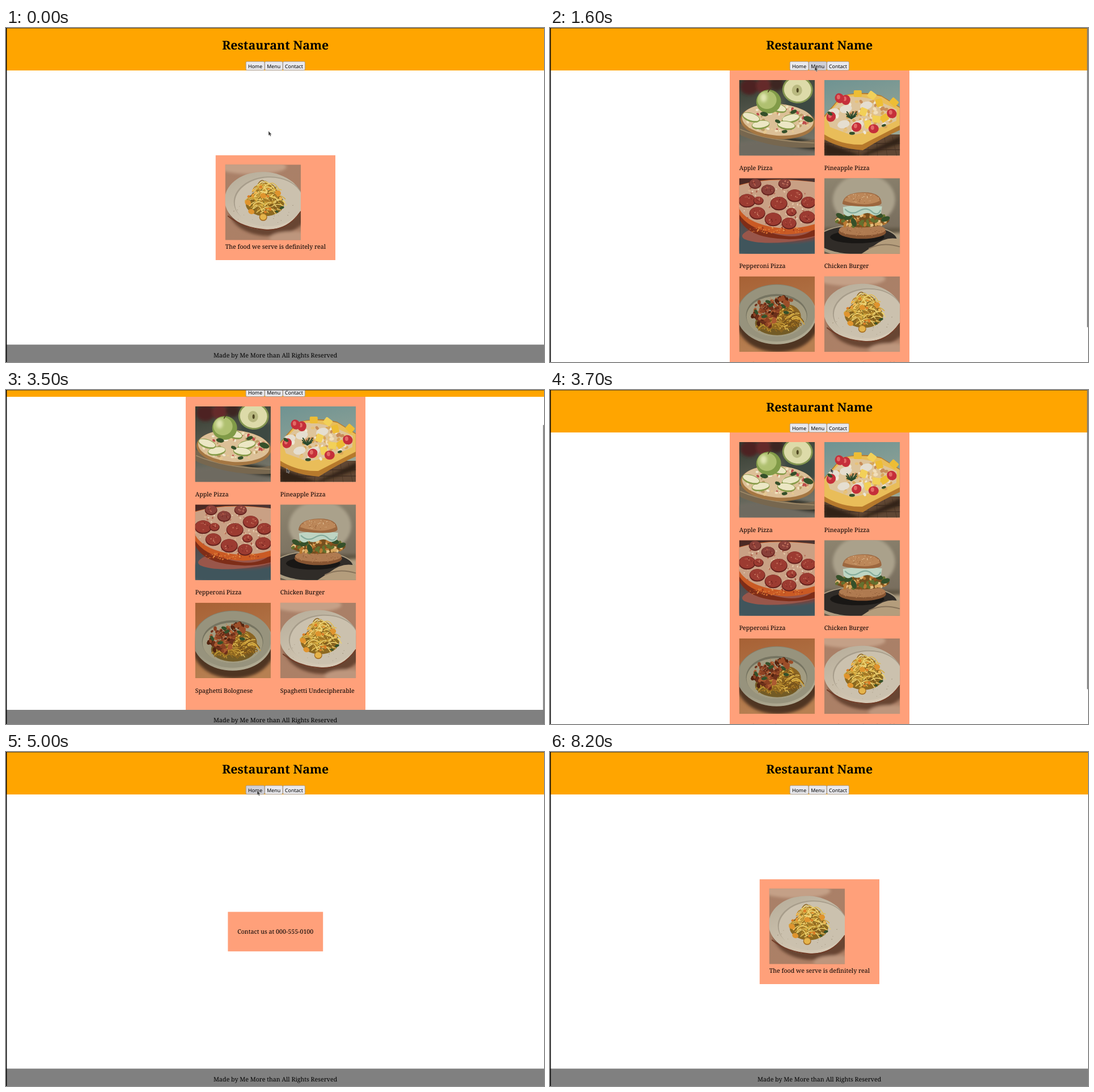
An HTML page for the animation above (8300 ms loop, 949 by 590 pixels).

```html
<!DOCTYPE html>
<html lang="en">
<head>
<meta charset="utf-8">
<title>Restaurant Name</title>
<style>
  html, body { margin: 0; width: 100%; height: 100%; overflow: hidden; background: #fff; }
  svg#stage { display: block; width: 949px; height: 590px; }
  text { font: 10.667px "Noto Serif", serif; fill: #000; text-rendering: geometricPrecision; }
  .title { font-size: 21.333px; font-weight: 700; }
  .button text { font: 8.889px "Noto Sans", sans-serif; }
  .button rect { fill: #e9e9ed; stroke: #8f8f9d; stroke-width: .7; }
  .button.hover rect { fill: #d0d0d7; }
  .button.active rect { fill: #b1b1b9; }
  .middle { text-anchor: middle; }
</style>
</head>
<body>
<svg id="stage" viewBox="0 0 949 590" xmlns="http://www.w3.org/2000/svg">
  <defs>
    <filter id="soft" x="-30%" y="-30%" width="160%" height="160%"><feGaussianBlur stdDeviation="2.5"/></filter>
    <filter id="fine" x="-10%" y="-10%" width="120%" height="120%"><feGaussianBlur stdDeviation=".55"/></filter>
    <g id="dishes"></g>
  </defs>
  <rect width="949" height="590" fill="#fff"/>
  <g id="view"></g>
  <rect width="949" height=".8" fill="#222" opacity=".75"/>
  <rect width="1.4" height="590" fill="#000"/>
  <rect id="bar" x="947.4" width="1.6" height="528.5" fill="#777"/>
  <path id="cursor" d="M0 0V8L1.8 6.5 3.1 9.2 4.6 8.5 3.4 5.9H5.6Z" fill="#3c3c3c" stroke="#ddd" stroke-width=".5"/>
</svg>
<script>
const $ = id => document.getElementById(id);

// ---------- drawing helpers ----------
let seed = 1;
const random = () => (seed = seed * 16807 % 2147483647) / 2147483647;
const pick = list => list[Math.floor(random() * list.length)];
const times = (n, make) => Array.from({ length: n }, (_, i) => make(i)).join('');

const rect = (x, y, w, h, fill) => `<rect x="${x}" y="${y}" width="${w}" height="${h}" fill="${fill}"/>`;
const oval = (x, y, rx, ry, fill, turn = 0, extra = '') =>
  `<ellipse cx="${x}" cy="${y}" rx="${rx}" ry="${ry}" fill="${fill}" transform="rotate(${turn} ${x} ${y})" ${extra}/>`;
const path = (d, fill, extra = '') => `<path d="${d}" fill="${fill}" ${extra}/>`;
const line = (d, color, width) => path(d, 'none', `stroke="${color}" stroke-width="${width}" stroke-linecap="round"`);
const soft = body => `<g filter="url(#soft)">${body}</g>`;
const fine = body => `<g filter="url(#fine)">${body}</g>`;

function inOval(x, y, rx, ry) {
  const a = random() * Math.PI * 2, r = Math.sqrt(random());
  return [x + Math.cos(a) * rx * r, y + Math.sin(a) * ry * r];
}
const scatter = (n, area, size, colors) => times(n, () => {
  const [x, y] = inOval(...area), r = size * (.5 + random() * .6);
  return oval(x.toFixed(1), y.toFixed(1), r.toFixed(1), (r * .7).toFixed(1), pick(colors), Math.round(random() * 180));
});
const noodles = (n, area, colors) => times(n, () => {
  const [x, y] = inOval(...area), w = 5 + random() * 9, h = random() * 16 - 8;
  const p = v => v.toFixed(1);
  return line(`M${p(x - w)} ${p(y + h / 2)}Q${p(x)} ${p(y - 12 + h)} ${p(x + w)} ${p(y - h / 3)}`, pick(colors), 1.5);
});
const backdrop = (id, from, to) =>
  `<linearGradient id="${id}" x2=".25" y2="1"><stop stop-color="${from}"/><stop offset="1" stop-color="${to}"/></linearGradient>` +
  rect(0, 0, 134, 134, `url(#${id})`);
const plate = (id, x, y, rx, ry, light, dark, turn = 0) =>
  `<linearGradient id="${id}" x2=".6" y2="1"><stop stop-color="${dark}"/><stop offset="1" stop-color="${light}"/></linearGradient>` +
  oval(x, y, rx, ry, `url(#${id})`, turn);

// ---------- dishes, each 133.3 square ----------
const leaf = (x, y, turn, size = 7) => oval(x, y, size, size * .55, '#35502a', turn);

const dishes = {
  apple: () => backdrop('bg1', '#343b31', '#77766a') +
    soft(oval(18, 12, 16, 14, '#4d2422') + oval(43, 10, 13, 14, '#652c29') + oval(66, 7, 12, 12, '#3d2520') +
      rect(80, 30, 54, 35, '#3e4a43') + oval(60, 122, 85, 16, '#6e6b60') + oval(112, 113, 40, 8, '#2b2922', 10)) +
    fine(path('M0 76Q28 92 70 102T134 104V119Q82 122 40 110T0 94Z', '#77674f') +
      line('M2 87Q50 108 132 111', '#a08b69', 1.5) +
      oval(68, 73, 66, 31, '#a57743', 4) + oval(68, 70, 63, 28, '#dcc097', 4) +
      scatter(95, [68, 70, 59, 25], 3.2, ['#efe0bb', '#cf8a68', '#bd4d4b', '#e6c890', '#b99a62', '#f0e9d0']) +
      oval(103, 17, 27, 24, '#839550', 5) + oval(103, 17, 24, 21, '#dddba9', 5) +
      oval(102, 18, 9, 10, '#b9b980') + oval(103, 18, 2, 4, '#504923') +
      [[38, 79, -8], [91, 68, -12], [21, 66, 18], [68, 49, 18], [83, 80, 8]].map(([x, y, a]) =>
        oval(x, y, 16, 8, '#879b49', a) + oval(x, y - 1, 15, 6, '#ece7c4', a)).join('') +
      oval(52, 38, 22, 21, '#819b48') + oval(49, 35, 17, 16, '#afc070') +
      soft(oval(43, 31, 6, 8, '#e0e5b0')) + line('M51 21Q53 16 57 14', '#4b3721', 1.5) +
      leaf(44, 60, 10) + leaf(68, 73, 25, 5) + leaf(96, 56, -20, 6) + leaf(122, 69, 18, 9) + leaf(80, 91, -10, 5)),

  pineapple: () => backdrop('bg2', '#6f9392', '#a0aa98') +
    rect(0, 96, 134, 38, '#604734') + line('M0 112H134M0 123H134', '#38291f', 1.2) +
    times(9, i => line(`M${i * 17 - 8} 134L${i * 14 + 8} 100`, '#493526', .8)) +
    soft(path('M0 110L64 133 134 99V112L70 134H0Z', '#302419')) +
    fine(path('M0 63L30 28Q65 18 100 27L134 48V88Q104 101 68 124Q32 122 0 105Z', '#b6792c') +
      path('M0 66L32 27Q70 21 101 29L133 49V80L67 114Q30 115 0 96Z', '#e9bd59') +
      path('M3 63L36 30Q75 24 128 52L127 72Q85 92 48 97L10 83Z', '#dec49a') +
      scatter(85, [66, 63, 58, 30], 4, ['#f2dfb9', '#d8a659', '#efe7d5', '#c88c58', '#e8c279']) +
      [[16, 57], [38, 51], [59, 79], [34, 78], [74, 45]].map(([x, y]) => oval(x, y, 11, 7, '#e5ded0', -15)).join('') +
      [[59, 24], [84, 27], [97, 40], [69, 56], [106, 67], [92, 69], [123, 39], [77, 78]].map(([x, y], i) =>
        `<rect x="${x - 7}" y="${y - 6}" width="14" height="12" rx="2" fill="${i % 2 ? '#f2d058' : '#edbd35'}" transform="rotate(${i * 37} ${x} ${y})"/>`).join('') +
      [[38, 35], [12, 65], [57, 83], [87, 86], [119, 59], [27, 32]].map(([x, y], i) =>
        oval(x, y, 8, 9, '#c52f3a', i * 30) + oval(x - 2, y - 2, 3, 4, '#e36a66')).join('') +
      times(9, i => line(`M48 68l${Math.round(Math.cos(i * .5 + 2.6) * 9)} ${Math.round(-4 - (i % 3) * 4)}`, '#29492d', 2)) +
      leaf(10, 59, 35, 5) + leaf(49, 94, 0, 5) + leaf(105, 80, -20, 4)),

  pepperoni: () => backdrop('bg3', '#4a251f', '#53666c') +
    soft(oval(68, 118, 90, 22, '#41555b') + oval(85, 95, 72, 18, '#78423a')) +
    fine(oval(80, 96, 75, 17, '#99564a', -5) +
      path('M0 52Q20 88 65 99T134 88V102Q96 112 54 105T0 72Z', '#7e2d18') +
      path('M0 12Q55-5 134 7V91Q94 104 55 96T0 64Z', '#ca5a24') +
      path('M0 13Q50-3 134 7V81Q92 94 52 85T0 54Z', '#c9a084') +
      scatter(120, [68, 47, 70, 41], 2, ['#e2c3a3', '#b87059', '#d9b28f', '#a95c47', '#e8d3bb']) +
      scatter(65, [66, 91, 57, 6], 1.8, ['#d87432', '#a63b1c', '#e28d47'])) +
    fine([[98, 30, 14], [70, 44, 15], [32, 61, 14], [60, 72, 15], [120, 68, 14], [88, 79, 13], [92, 59, 9],
      [122, 42, 13], [51, 20, 12], [80, 9, 11], [14, 39, 15], [34, 39, 9], [28, 9, 11]].map(([x, y, r]) =>
      oval(x, y + 1, r, r * .8, '#64211d') + oval(x, y, r - 1, r * .72, y < 25 ? '#894039' : '#9c3b31') +
      scatter(7, [x, y, r * .6, r * .45], 1.6, ['#b85a49', '#7e2a24', '#c57660'])).join('')),

  burger: () => backdrop('bg4', '#8d846f', '#74695a') +
    soft(oval(70, 38, 55, 45, '#aaa18b') + rect(0, 88, 134, 46, '#605644') + oval(120, 116, 45, 18, '#b3a083', -8)) +
    oval(58, 111, 74, 29, '#aa9c82') + oval(58, 109, 70, 25, '#302c28') +
    fine(oval(58, 104, 48, 11, '#191715') +
      path('M88 119Q110 101 134 108V134H65Z', '#b49d7c') + line('M79 124Q103 112 133 121', '#87735a', 2) +
      oval(67, 95, 42, 12, '#875532') + oval(67, 91, 41, 10, '#af7a50') +
      oval(67, 74, 48, 13, '#76501f') +
      scatter(80, [67, 74, 46, 13], 4, ['#d9a75e', '#b97832', '#8e501d', '#e6c184', '#64712f']) +
      [[28, 67, 30], [42, 69, -20], [96, 65, 20], [108, 72, -20], [52, 78, 70]].map(a => leaf(...a, 8)).join('') +
      path('M33 51Q65 45 102 50L100 62Q91 69 84 64T67 64 50 64Q40 71 34 62Z', '#bed5c3') +
      line('M37 55Q48 66 61 58T84 59 99 57', '#85ab9b', 2.2) +
      path('M32 45Q34 26 67 25T101 44Q99 51 67 50T32 45Z', '#9c673f') +
      path('M35 40Q39 26 67 26T98 40Q84 47 67 46T35 40Z', '#bc8759') +
      scatter(45, [67, 35, 29, 8], .9, ['#d8b284', '#925e37', '#e3c8a2']) +
      scatter(50, [67, 94, 36, 9], 1, ['#bd8759', '#8a5835'])),

  bolognese: () => backdrop('bg5', '#a76135', '#b78052') +
    soft(oval(68, 80, 72, 54, '#4f3523')) +
    plate('pl5', 66, 67, 70, 53, '#b0aa92', '#787664') + oval(66, 65, 68, 50, '#97937d') +
    oval(66, 69, 54, 38, '#767461') + oval(66, 71, 53, 36, '#a29c82') +
    fine(oval(67, 83, 39, 21, '#735b25') + oval(82, 71, 27, 22, '#8a6422') +
      noodles(85, [80, 76, 24, 20], ['#d0a53c', '#a77722', '#e0bc57', '#76521c']) +
      noodles(20, [50, 91, 20, 8], ['#bd9132', '#94691f']) +
      scatter(75, [47, 65, 23, 23], 5, ['#6b2f1a', '#8c4223', '#ac5a31', '#50220f']) +
      scatter(28, [75, 47, 19, 10], 4.5, ['#75341b', '#9c4e29', '#542410']) +
      scatter(22, [56, 53, 28, 16], 1.2, ['#d98450', '#bb7244']) +
      [[51, 45, 20], [56, 51, -30], [30, 63, 60], [83, 64, 10], [44, 71, -10], [78, 53, 40]].map(a => leaf(...a, 5)).join('')),

  pasta: () => backdrop('bg6', '#a98068', '#ac8066') +
    soft(oval(48, 4, 60, 13, '#c4a087') + oval(77, 80, 70, 46, '#674432') + oval(118, 130, 40, 12, '#bd967d')) +
    plate('pl6', 68, 64, 69, 51, '#d5c9b5', '#b5ac99', 3) +
    line('M5 91Q31 112 70 115T133 83', '#713b26', 1.8) +
    oval(76, 64, 61, 43, '#a79d8b', -3) + oval(77, 66, 60, 43, '#cbc1ae', -3) +
    scatter(24, [70, 80, 58, 30], .8, ['#81715b', '#9b8c75']) +
    fine(oval(70, 69, 34, 22, '#8c6921') + oval(72, 52, 21, 20, '#9e7524') +
      noodles(65, [71, 68, 27, 19], ['#d5ab3e', '#b3832a', '#ecd070', '#7b571b']) +
      noodles(45, [72, 49, 17, 14], ['#e0bb50', '#bb8b2d', '#efd578', '#8b651f']) +
      scatter(16, [68, 60, 31, 26], 3.2, ['#e39632', '#db7e27', '#edb652']) +
      [[40, 67], [46, 83], [93, 50], [67, 55]].map(([x, y]) => oval(x, y, 5.5, 4.5, '#df942e', 20)).join('') +
      oval(67, 93, 7, 6.5, '#a66d20') + oval(67, 92.5, 5.7, 5.2, '#e5b44b') +
      scatter(22, [73, 62, 31, 27], 1.1, ['#40501e', '#61662b']) + leaf(100, 76, -20, 4) + leaf(91, 83, 35, 3)),
};

$('dishes').innerHTML = Object.entries(dishes).map(([name, draw], i) => {
  seed = 4177 + i * 911;
  return `<symbol id="${name}" viewBox="0 0 133.3 133.3">${draw()}</symbol>`;
}).join('');

// ---------- page ----------
const buttons = [['Home', 423.2, 455.9], ['Menu', 456.6, 487.9], ['Contact', 488.6, 527.4]];
const menu = [['apple', 'Apple Pizza'], ['pineapple', 'Pineapple Pizza'], ['pepperoni', 'Pepperoni Pizza'],
  ['burger', 'Chicken Burger'], ['bolognese', 'Spaghetti Bolognese'], ['pasta', 'Spaghetti Undecipherable']];

const text = (x, y, words, kind = '') => `<text x="${x}" y="${y}" class="${kind}">${words}</text>`;
const dish = (name, x, y) => `<use href="#${name}" x="${x}" y="${y}" width="133.3" height="133.3"/>`;
const card = (x, y, w, h) => rect(x, y, w, h, '#ffa07a');
const footer = y => rect(0, y, 949, 31.2, '#808080') +
  text(475.2, y + 22.3, 'Made by Me More than All Rights Reserved', 'middle');

const pages = {
  Home: card(369.8, 224.8, 211.2, 185.2) + dish('pasta', 386.7, 241.3) +
    text(386.7, 389.8, 'The food we serve is definitely real') + footer(559.3),
  Menu: card(317, 75, 317, 553) + menu.map(([name, label], i) => {
    const x = i % 2 ? 483.8 : 333.7, y = 92 + Math.floor(i / 2) * 173.35;
    return dish(name, x, y) + text(x, y + 158.8, label);
  }).join('') + footer(628),
  Contact: card(391.4, 282.4, 167.8, 69.8) + text(475.2, 321.2, 'Contact us at 000-555-0100', 'middle') + footer(559.3),
};

$('view').innerHTML = rect(0, 0, 949, 75, '#ffa500') + text(475.2, 37.7, 'Restaurant Name', 'title middle') +
  buttons.map(([name, a, b]) => `<g class="button" id="button${name}"><rect x="${a}" y="59.3" width="${b - a}" height="15.3" rx="2"/>` +
    text((a + b) / 2, 70.5, name, 'middle') + '</g>').join('') +
  Object.entries(pages).map(([name, body]) => `<g id="page${name}">${body}</g>`).join('');

// ---------- timeline ----------
const pageSteps = [[0, 'Home'], [1300, 'Menu'], [4700, 'Contact'], [6700, 'Home']];
const pressTimes = [1200, 4600, 6600];
const scrollSteps = [[0, 0, 0], [2400, 5.4, 5.5], [2600, 69.2, 61.8], [3500, 63, 61.8], [3600, 24, 22], [3700, 0, 0]];

// Pointer moves: start, end, then the points passed at an even pace.
const moves = [
  [200, 900, [463, 182], [464, 172], [474, 142], [488, 104], [497, 78], [498, 69], [479, 69], [467, 68]],
  [1800, 2400, [467, 68], [471, 80], [481, 105], [489, 125], [494, 136], [495, 138]],
  [3700, 4300, [495, 138], [499, 124], [504, 98], [506, 76], [506, 68]],
  [4700, 5000, [506, 68], [478, 69], [452, 69], [443, 68]],
  [6900, 7800, [443, 68], [452, 88], [472, 128], [493, 178], [503, 205], [480, 187], [393, 137], [245, 76], [112, 27], [41, 3]],
];

const stepAt = (steps, t) => steps.filter(step => step[0] <= t).pop();

function pointerAt(t) {
  const [start, end, ...points] = stepAt(moves, t) || moves[0];
  const place = Math.min(1, Math.max(0, (t - start) / (end - start))) * (points.length - 1);
  const i = Math.min(Math.floor(place), points.length - 2);
  return points[i].map((v, axis) => v + (points[i + 1][axis] - v) * (place - i));
}

function render(time) {
  const t = Math.floor(time / 100) * 100;
  const page = stepAt(pageSteps, t)[1];
  const [, scroll, thumb] = stepAt(scrollSteps, t);
  const [x, y] = pointerAt(t);

  for (const name in pages) $('page' + name).style.display = name === page ? '' : 'none';
  for (const [name, a, b] of buttons) {
    const over = t < 7900 && x >= a - .4 && x <= b + .4 && y + scroll >= 59 && y + scroll <= 75;
    $('button' + name).setAttribute('class', 'button' + (over ? pressTimes.includes(t) ? ' active' : ' hover' : ''));
  }
  $('view').setAttribute('transform', `translate(0 ${-scroll})`);
  $('bar').setAttribute('y', thumb);
  $('bar').style.display = page === 'Menu' ? '' : 'none';
  $('cursor').setAttribute('transform', `translate(${x} ${y})`);
  $('cursor').style.display = t < 7900 ? '' : 'none';
}

const began = performance.now();
function tick() {
  render((performance.now() - began) % 8300);
  requestAnimationFrame(tick);
}
tick();
</script>
</body>
</html>
```
